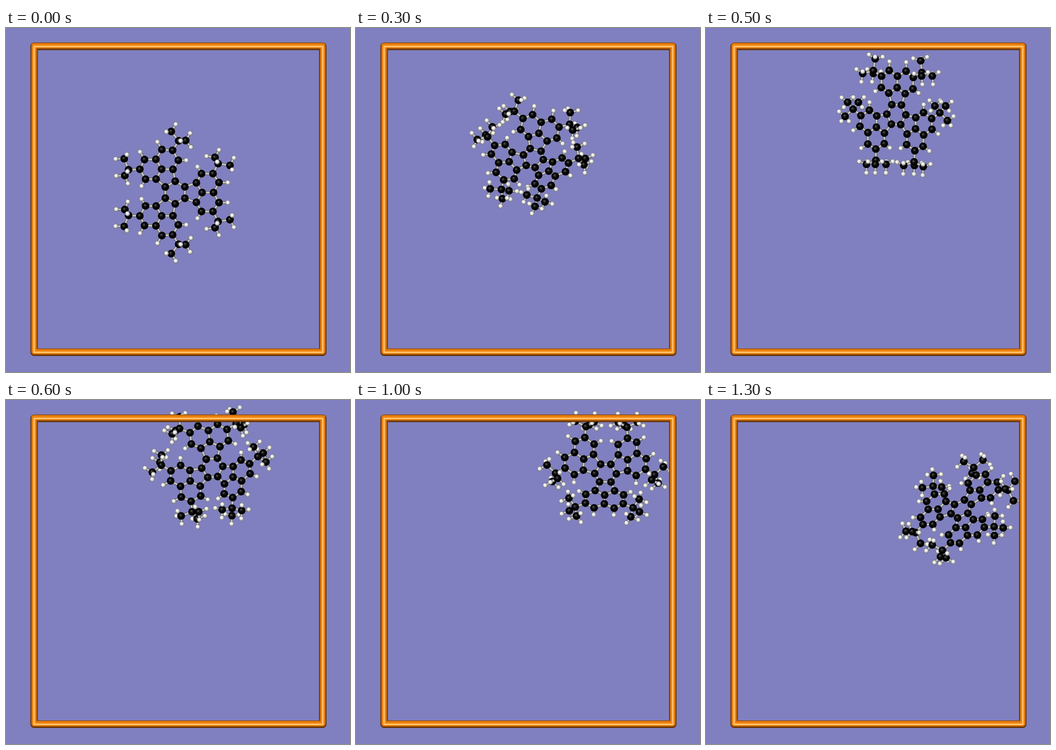
Animation of 600x600 px, one loop 1.4 s. Source, as an HTML page with a canvas:

```html
<!DOCTYPE html>
<html lang="en">
<head>
<meta charset="utf-8">
<title>Molecule in a box</title>
<style>
  html, body { margin: 0; height: 100%; overflow: hidden; background: #8080c0; }
  canvas { display: block; }
</style>
</head>
<body>
<canvas id="stage" width="600" height="600"></canvas>
<script>
const ctx = document.getElementById('stage').getContext('2d');
const LOOP = 1400, STEP = 100, RAD = Math.PI / 180;
const CC = 20, METHYL = 21, CH = 15; // bond lengths

// time, centre x and y, then in degrees: spin, tilt direction, tilt, bending of the arms
const keys = [
  [0, 295, 287, 0, 70, 0, 0],
  [300, 310, 229, 45, 70, 20, 27],
  [500, 332, 151, 32, 0, 33, 0],
  [600, 361, 119, 26, 40, 16, 20],
  [800, 427, 114, 78, 61, 27, 10],
  [1100, 436, 143, 91, 90, 20, 22],
  [1300, 445, 190, 70, 55, 47, 0]
];

// smooth curve through the keys
function poseAt(t) {
  const end = keys.length - 1;
  let i = 0;
  while (i < end - 1 && t >= keys[i + 1][0]) i++;
  const from = keys[i], dt = keys[i + 1][0] - from[0], u = (t - from[0]) / dt;
  const slope = (j, n) => {
    const p = keys[Math.max(0, j - 1)], q = keys[Math.min(end, j + 1)];
    return (q[n] - p[n]) / (q[0] - p[0]) * dt;
  };
  return from.map((v, n) => {
    const d = keys[i + 1][n] - v, m0 = slope(i, n), m1 = slope(i + 1, n);
    return v + u * (m0 + u * (3 * d - 2 * m0 - m1 + u * (m0 + m1 - 2 * d)));
  });
}

// adds scaled vectors: mix(p, k, v, ...) = p + k v + ...
const mix = (p, ...terms) => p.map((c, i) => {
  for (let n = 0; n < terms.length; n += 2) c += terms[n] * terms[n + 1][i];
  return c;
});

// flat arm: two fused rings along x, mirrored in y, with an end group on each side
const arm = [];
const add = (el, p) => arm.push({ el, p });
add('C', [47, 0, 0]);
add('C', [47 + CC, 0, 0]);
for (const s of [-1, 1]) {
  for (const [x, y] of [[17, 10], [37, 17], [46, 33], [66, 33], [76.5, 17.5]]) add('C', [x, y * s, 0]);
  add('H', [39, 45 * s, 0]);
  add('H', [92, 17.5 * s, 0]);
  const hub = [75, 50.5 * s, 0];
  add('C', hub);
  const dirs = [[-.47, -.88 * s, 0], [.98, -.15 * s, 0], [-.26, .51 * s, .816], [-.26, .51 * s, -.816]];
  for (const out of dirs.slice(1)) {
    const methyl = mix(hub, METHYL, out);
    add('C', methyl);
    for (const d of dirs) if (d !== out) add('H', mix(methyl, -CH, d));
  }
}

// places all three arms; tilting turns the plane, bending lifts each arm along its normal
function place([, cx, cy, spin, dir, tilt, bend]) {
  const c = Math.cos(dir * RAD), s = Math.sin(dir * RAD);
  const ct = Math.cos(tilt * RAD), st = Math.sin(tilt * RAD);
  const cb = Math.cos(bend * RAD), sb = Math.sin(bend * RAD);
  const inPlane = deg => {
    const along = Math.cos((deg - dir) * RAD), across = Math.sin((deg - dir) * RAD);
    return [along * ct * c - across * s, along * ct * s + across * c, along * st];
  };
  const up = [-st * c, -st * s, ct];
  return [0, 120, 240].flatMap(turn => {
    const flat = inPlane(spin + turn), b = inPlane(spin + turn + 90);
    const a = mix([0, 0, 0], cb, flat, sb, up), n = mix([0, 0, 0], cb, up, -sb, flat);
    return arm.map(({ el, p }) => ({ el, p: mix([cx, cy, 0], p[0], a, p[1], b, p[2], n) }));
  });
}

// neighbours in the flat molecule are bonded
const bonds = [];
place([0, 0, 0, 0, 0, 0, 0]).forEach((atom, i, all) => {
  for (let j = 0; j < i; j++) {
    const gap = Math.hypot(...mix(atom.p, -1, all[j].p));
    if (gap < 23 && atom.el + all[j].el !== 'HH') bonds.push([i, j]);
  }
});

const looks = {
  C: { r: 6.7, shades: ['#666', '#161616', '#000', '#000'] },
  H: { r: 4.3, shades: ['#fff', '#f4f4f4', '#ccc', '#6a6a6a'] }
};

function drawAtom({ el, p: [x, y] }) {
  const { r, shades } = looks[el];
  const g = ctx.createRadialGradient(x - r * .2, y - r * .25, 0, x, y, r);
  shades.forEach((shade, i) => g.addColorStop(i / 3, shade));
  ctx.fillStyle = g;
  ctx.beginPath();
  ctx.arc(x, y, r, 0, 7);
  ctx.fill();
}

function drawBond(p, q) {
  for (const [color, width] of [['#5c5c5c', 5], ['#a0a0a0', 3.4], ['#d8d8d8', 1.4]]) {
    ctx.strokeStyle = color;
    ctx.lineWidth = width;
    ctx.beginPath();
    ctx.moveTo(p[0], p[1]);
    ctx.lineTo(q[0], q[1]);
    ctx.stroke();
  }
}

function drawMolecule(pose) {
  const atoms = place(pose);
  const parts = atoms.map(atom => ({ z: atom.p[2], draw: () => drawAtom(atom) }));
  for (const [i, j] of bonds) {
    const p = atoms[i].p, q = atoms[j].p;
    parts.push({ z: Math.min(p[2], q[2]) - 1, draw: () => drawBond(p, q) });
  }
  parts.sort((p, q) => p.z - q.z).forEach(part => part.draw());
}

function drawBox() {
  ctx.lineJoin = 'round';
  const layers = [['#5a2c00', 13, 0], ['#a85600', 11, -.8], ['#ec800c', 8, -1.2],
                  ['#ffa838', 3.4, .2], ['#ffcc80', 1.4, .2]];
  for (const [color, width, shift] of layers) {
    ctx.strokeStyle = color;
    ctx.lineWidth = width;
    ctx.strokeRect(49, 32 + shift, 503.5, 533.5);
  }
}

function render(now) {
  ctx.fillStyle = '#8080c0';
  ctx.fillRect(0, 0, 600, 600);
  drawMolecule(poseAt(Math.floor(now % LOOP / STEP) * STEP));
  drawBox();
}

let start;
function tick(now) {
  start ??= now;
  render(now - start);
  requestAnimationFrame(tick);
}
render(0);
requestAnimationFrame(tick);
</script>
</body>
</html>
```
